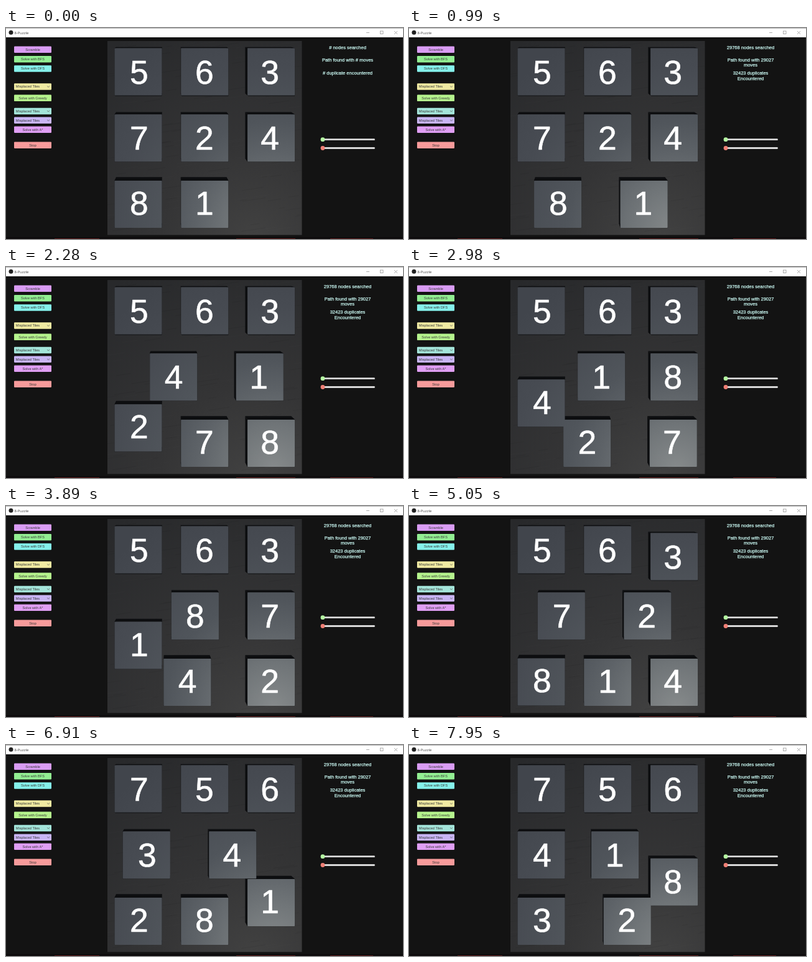
Recreate the animation shown at these times as an HTML page with a canvas. Size 638x340 px, loop 7.99 s.

```html
<!DOCTYPE html>
<html lang="en">
<head>
<meta charset="utf-8">
<title>8-Puzzle</title>
<style>
  html, body { margin: 0; width: 100%; height: 100%; overflow: hidden; background: #131313; }
  canvas { display: block; width: 638px; height: 340px; }
</style>
</head>
<body>
<canvas id="stage" width="638" height="340"></canvas>
<script>
const W = 638, H = 340, LOOP = 7990;
const SANS = '"Liberation Sans", Arial, sans-serif';
const SIZE = 76, LEFT = 174.5, TOP = 32.5, PITCH = 106.8;
const FIRST_MOVE = 720, MOVE_GAP = 147.6, MOVE_TIME = 496, RESULT_AT = 740;

const START = "56372481 ";
const MOVES = "18724".repeat(5) + "1872" + "3657234" + "18234".repeat(2) + "182";

const ctx = document.getElementById("stage").getContext("2d");

// Each tile's list of slides, found by following the blank cell.
const slides = {};
const cells = START.split("");
[...MOVES].forEach((tile, i) => {
  const from = cells.indexOf(tile), to = cells.indexOf(" ");
  (slides[tile] ||= []).push({ at: FIRST_MOVE + i * MOVE_GAP, from, to });
  cells[to] = tile;
  cells[from] = " ";
});

const cellX = c => LEFT + (c % 3) * PITCH;
const cellY = c => TOP + Math.floor(c / 3) * PITCH;

function tileAt(tile, t) {
  let from = START.indexOf(tile), to = from, p = 0;
  for (const s of slides[tile] || []) {
    if (t < s.at) break;
    ({ from, to } = s);
    p = Math.min(1, (t - s.at) / MOVE_TIME);
  }
  return {
    tile,
    x: cellX(from) + (cellX(to) - cellX(from)) * p,
    y: cellY(from) + (cellY(to) - cellY(from)) * p
  };
}

function random(seed) {
  return () => (seed = (seed * 16807) % 2147483647) / 2147483647;
}

function rect(g, x, y, w, h, fill, r = 0) {
  g.fillStyle = fill;
  g.beginPath();
  g.roundRect(x, y, w, h, r);
  g.fill();
}

function dot(g, x, y, r, fill) {
  g.fillStyle = fill;
  g.beginPath();
  g.arc(x, y, r, 0, Math.PI * 2);
  g.fill();
}

function line(g, points, color, width) {
  g.strokeStyle = color;
  g.lineWidth = width;
  g.beginPath();
  points.forEach(([x, y]) => g.lineTo(x, y));
  g.stroke();
}

function label(g, text, x, y, size, fill, { align = "center", font = SANS, weight = 0 } = {}) {
  g.font = `${size}px ${font}`;
  g.fillStyle = g.strokeStyle = fill;
  g.textAlign = align;
  g.textBaseline = "alphabetic";
  g.fillText(text, x, y);
  if (weight) {
    g.lineWidth = weight;
    g.lineJoin = "round";
    g.strokeText(text, x, y);
  }
}

function glow(g, x, y, r, stops) {
  const grad = g.createRadialGradient(x, y, 0, x, y, r);
  stops.forEach(([at, color]) => grad.addColorStop(at, color));
  return grad;
}

function drawWindow(g) {
  rect(g, 0, 0, W, H, "#131313");
  rect(g, 0, 337, W, 3, "#0d0b0c");
  for (const [x, w] of [[78, 72], [370, 95], [521, 69]]) rect(g, x, 339, w, 1, "#5c1c1c");

  rect(g, 0, 0, W, 15, "#ffffff");
  rect(g, 0, 0, W, 1, "#b4b4b4");
  dot(g, 8, 7.3, 3.5, "#222222");
  label(g, "8-Puzzle", 13.5, 9.5, 5.9, "#444444", { align: "left", font: '"Open Sans", sans-serif' });
  line(g, [[579, 7.5], [584, 7.5]], "#999999", 0.8);
  g.strokeRect(601.5, 5, 4.5, 4.5);
  line(g, [[624, 5], [629, 10]], "#888888", 0.7);
  line(g, [[629, 5], [624, 10]], "#888888", 0.7);
}

function drawBoard(g) {
  g.save();
  g.beginPath();
  g.rect(163, 21, 312.5, 312.5);
  g.clip();
  g.fillStyle = glow(g, 400, 345, 390, [[0, "#424242"], [0.4, "#343435"], [1, "#28292b"]]);
  g.fillRect(163, 21, 313, 313);
  const rnd = random(41);
  for (let i = 0; i < 170; i++) {
    const x = 150 + rnd() * 320, y = 21 + rnd() * 313, len = 8 + rnd() * 34;
    const color = rnd() < 0.5 ? "rgba(0,0,0,.08)" : "rgba(255,255,255,.018)";
    line(g, [[x, y], [x + len, y - len * 0.15]], color, 0.8);
  }
  g.restore();
}

function drawButtons(g) {
  const buttons = [
    [29.5, "Scramble", "#d99cf3"],
    [45, "Solve with BFS", "#92ee92"],
    [60.3, "Solve with DFS", "#85f1eb"],
    [89.2, "Misplaced Tiles", "#f0eaa2", true],
    [107.6, "Solve with Greedy", "#b5f38d"],
    [128.7, "Misplaced Tiles", "#a4e5da", true],
    [143.5, "Misplaced Tiles", "#c9b5f5", true],
    [158.4, "Solve with A*", "#df9ef3"],
    [183.4, "Stop", "#f79b9b"]
  ];
  for (const [y, text, color, menu] of buttons) {
    rect(g, 13, y, 60, 10.5, color, 1.2);
    label(g, text, menu ? 15.8 : 43, y + 7.1, 5.6, "#3a3a3a", { align: menu ? "left" : "center" });
    if (menu) line(g, [[66, y + 4.3], [68, y + 6.2], [70, y + 4.3]], "#555555", 0.7);
  }
}

function drawSlider(g, y, color) {
  rect(g, 508, y - 1.4, 84.8, 2.8, "#d8d8d8", 1.2);
  dot(g, 509, y, 3.4, color);
}

const backdrop = document.createElement("canvas");
backdrop.width = W;
backdrop.height = H;
{
  const g = backdrop.getContext("2d");
  drawWindow(g);
  drawBoard(g);
  drawButtons(g);
  drawSlider(g, 179.7, "#b5f6a2");
  drawSlider(g, 193.5, "#f08076");
}

const faceFill = glow(ctx, 430, 325, 350, [
  [0, "#868a8b"], [0.2, "#707578"], [0.36, "#5d6267"], [0.5, "#50555b"], [0.75, "#474b52"], [1, "#41454c"]
]);

// Corners of the far end of a block, pulled towards the vanishing point.
const farX = x => x + 0.03 * (330 - x) - 2;
const farY = y => y - 0.02 * (y + 50);

function drawSides({ x, y }) {
  const near = [[x, y], [x + SIZE, y], [x + SIZE, y + SIZE], [x, y + SIZE]];
  const far = near.map(([a, b]) => [farX(a), farY(b)]);
  ctx.fillStyle = "#0d0e10";
  near.forEach((p, i) => {
    const j = (i + 1) % 4;
    ctx.beginPath();
    [p, near[j], far[j], far[i]].forEach(q => ctx.lineTo(...q));
    ctx.fill();
  });
  const lip = Math.max(0, 1.4 - (y - TOP) / 60);
  if (lip) rect(ctx, x + 1, y + SIZE, SIZE - 1, lip, "#1b1c1e");
}

function drawFace({ tile, x, y }) {
  rect(ctx, x, y, SIZE, SIZE, faceFill, 0.8);
  const cx = 318.7 + (x + SIZE / 2 - 319) * 0.985;
  const cy = y + SIZE / 2 + 1 - (y - TOP) * 0.012;
  label(ctx, tile, cx, cy + 18.5, 53.5, "#ffffff", { weight: 0.6 });
}

function drawResults(done) {
  const lines = done
    ? [["29768 nodes searched", 34.3], ["Path found with 29027", 53.6], ["moves", 62.2],
       ["32423 duplicates", 75.3], ["Encountered", 83.8]]
    : [["# nodes searched", 34.3], ["Path found with # moves", 53.6], ["# duplicate encountered", 75.3]];
  lines.forEach(([text, y]) => label(ctx, text, 549, y, 7.5, "#c8f6f0", { weight: 0.25 }));
}

function draw(t) {
  ctx.drawImage(backdrop, 0, 0);
  const tiles = [..."12345678"].map(n => tileAt(n, t));
  tiles.forEach(drawSides);
  tiles.forEach(drawFace);
  drawResults(t >= RESULT_AT);
}

const begin = performance.now();
function tick() {
  draw((performance.now() - begin) % LOOP);
  requestAnimationFrame(tick);
}
tick();
</script>
</body>
</html>
```
